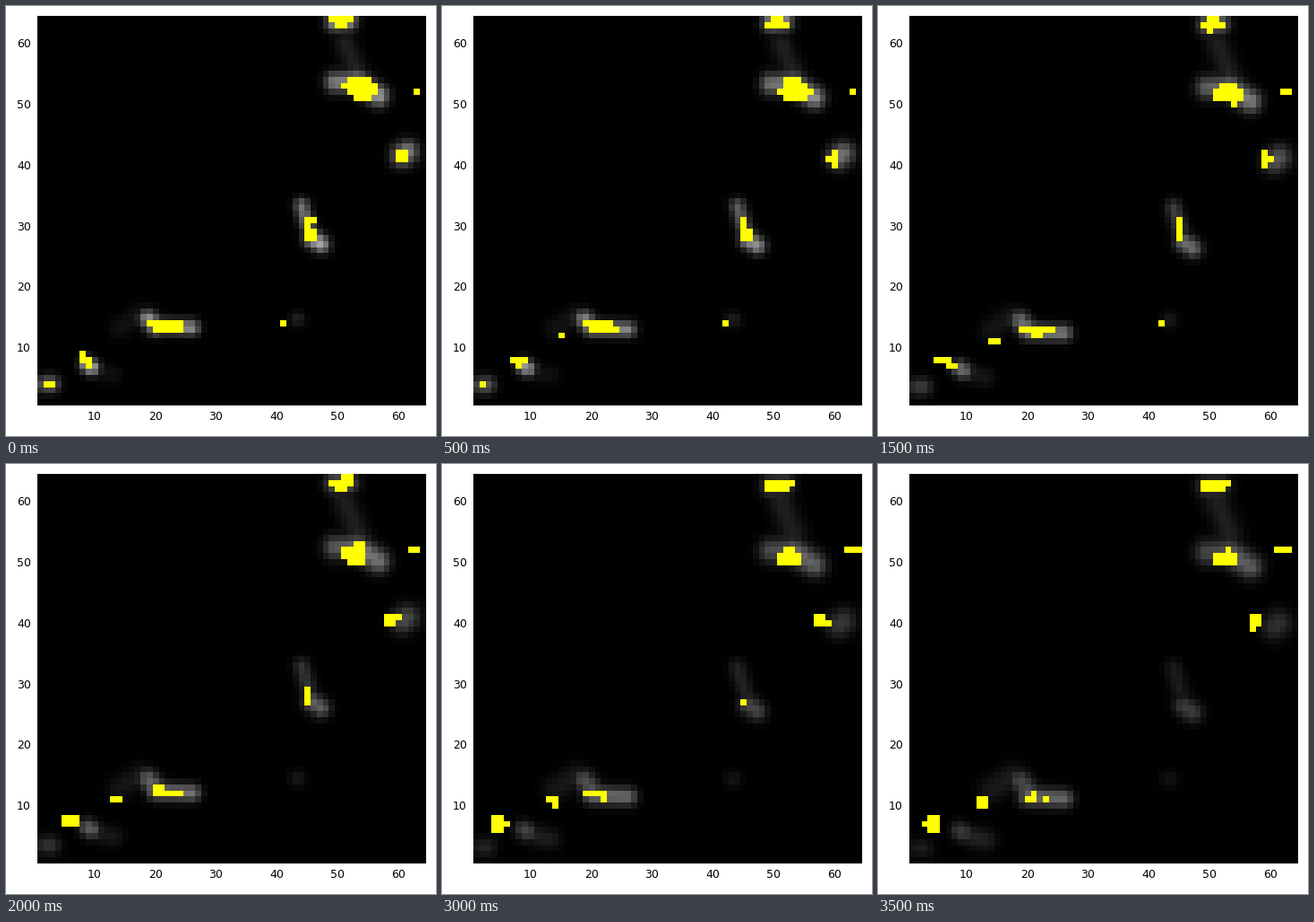
Write a matplotlib script that moves like this. It is 480 by 479 pixels and loops after 4000 ms.

```python
import numpy as np
import matplotlib.pyplot as plt
from matplotlib.animation import FuncAnimation

W, H, DPI = 480, 479, 100
LEFT, TOP, SIDE = 34.5, 11.2, 433.6
N = 64
STEPS = 8

# Fading trails: segment ends, vertical drift, width, brightness at start and end
TRAILS = [
    ((49.6, 63.6), (51.6, 63.8), -1.2, 1.1, .62, .25),
    ((51.2, 60.0), (53.2, 55.0), -0.3, 1.3, .12, .12),
    ((49.5, 53.6), (53.2, 53.6), -2.0, 1.2, .50, .28),
    ((53.2, 53.6), (56.6, 51.4), -2.1, 1.2, .62, .36),
    ((60.6, 41.6), (61.4, 42.2), -2.2, 1.3, .52, .19),
    ((44.0, 33.3), (45.0, 30.0), -0.8, 0.9, .45, .11),
    ((45.7, 28.0), (47.2, 27.0), -1.7, 1.0, .65, .24),
    ((43.2, 14.7), (43.4, 14.7), -0.4, 0.9, .13, .07),
    ((14.0, 13.2), (17.5, 15.5), -0.6, 1.3, .07, .10),
    ((18.7, 14.8), (20.0, 13.4), -0.7, 1.0, .56, .27),
    ((20.0, 13.5), (26.0, 13.3), -2.1, 0.9, .54, .40),
    ((8.8, 7.2), (9.4, 6.8), -1.3, 0.9, .70, .22),
    ((11.0, 6.0), (13.0, 5.6), -1.2, 1.1, .06, .13),
    ((1.8, 4.0), (2.8, 4.0), -1.0, 1.0, .42, .11),
]

# Walker groups: centre at start and end, reach, count at start and end
# (a negative end count empties the group early)
GROUPS = [
    ((50.4, 63.6), (51.0, 62.4), (1.6, 0.9), 6, 9),
    ((53.6, 52.4), (52.2, 50.3), (2.0, 1.6), 18, 9),
    ((63.2, 52.0), (62.5, 52.0), (1.0, 0.6), 1, 3),
    ((60.2, 41.6), (57.2, 40.2), (1.2, 1.3), 4, 5),
    ((45.6, 29.6), (44.4, 29.0), (1.1, 3.0), 7, 0),
    ((41.3, 14.6), (42.0, 14.5), (0.8, 0.8), 1, 0),
    ((21.3, 13.8), (21.5, 11.4), (2.8, 0.9), 11, 4),
    ((15.5, 12.0), (12.8, 10.5), (1.4, 0.9), 0, 4),
    ((8.0, 8.3), (4.2, 6.9), (1.4, 1.1), 4, 7),
    ((2.5, 4.0), (2.5, 4.0), (0.8, 0.5), 2, -8),
]

cols, rows = np.meshgrid(np.arange(1, N + 1), np.arange(1, N + 1))


def lerp(a, b, t):
    return a + (b - a) * t


def distance(p, q):
    """Distance of every cell from the segment p-q."""
    (x0, y0), (x1, y1) = p, q
    dx, dy = x1 - x0, y1 - y0
    u = ((cols - x0) * dx + (rows - y0) * dy) / (dx * dx + dy * dy)
    u = np.clip(u, 0, 1)
    return np.hypot(cols - x0 - u * dx, rows - y0 - u * dy)


def glow(t):
    """Trails sink, widen and fade exponentially."""
    field = np.zeros((N, N))
    for (x0, y0), (x1, y1), drift, width, a0, a1 in TRAILS:
        sink = drift * t
        d = distance((x0, y0 + sink), (x1, y1 + sink))
        s = width * (1 + 0.2 * t)
        cloud = a0 * (a1 / a0) ** t * np.exp(-d ** 2 / (2 * s * s))
        field = np.maximum(field, cloud) + 0.15 * np.minimum(field, cloud)
    return field


def walkers(i, t, field):
    """Each group fills its nearest cells, with a liking for bright trail."""
    rng = np.random.default_rng(40 + i)
    taken = np.zeros((N, N), bool)
    for (x0, y0), (x1, y1), (rx, ry), n0, n1 in GROUPS:
        dx = (cols - lerp(x0, x1, t)) / rx
        dy = (rows - lerp(y0, y1, t)) / ry
        cost = dx ** 2 + dy ** 2 - 2 * field + 0.9 * rng.random((N, N))
        count = max(0, round(lerp(n0, n1, t)))
        taken.flat[np.argsort(cost, axis=None)[:count]] = True
    return taken


def picture(i):
    t = i / (STEPS - 1)
    field = glow(t)
    img = np.repeat(np.clip(field, 0, 1)[:, :, None], 3, axis=2)
    img[walkers(i, t, field)] = (1, 1, 0)
    return img


fig = plt.figure(figsize=(W / DPI, H / DPI), dpi=DPI, facecolor="white")
ax = fig.add_axes([LEFT / W, 1 - (TOP + SIDE) / H, SIDE / W, SIDE / H])
image = ax.imshow(picture(0), origin="lower", interpolation="nearest",
                  aspect="auto", extent=(0.5, N + 0.5, 0.5, N + 0.5))
ax.axis("off")


def label(x, y, text, ha):
    fig.text(x / W, 1 - y / H, text, ha=ha, va="baseline",
             fontsize=9, family="DejaVu Sans", color="black")


for v in range(10, 61, 10):
    offset = (v - 0.5) * SIDE / N
    label(LEFT + offset, 460.7, str(v), "center")
    label(28, TOP + SIDE - offset + 4.8, str(v), "right")


def update(i):
    image.set_data(picture(i))
    return [image]


anim = FuncAnimation(fig, update, frames=STEPS, interval=500,
                     repeat=True, repeat_delay=0, blit=False)
plt.show()
```
